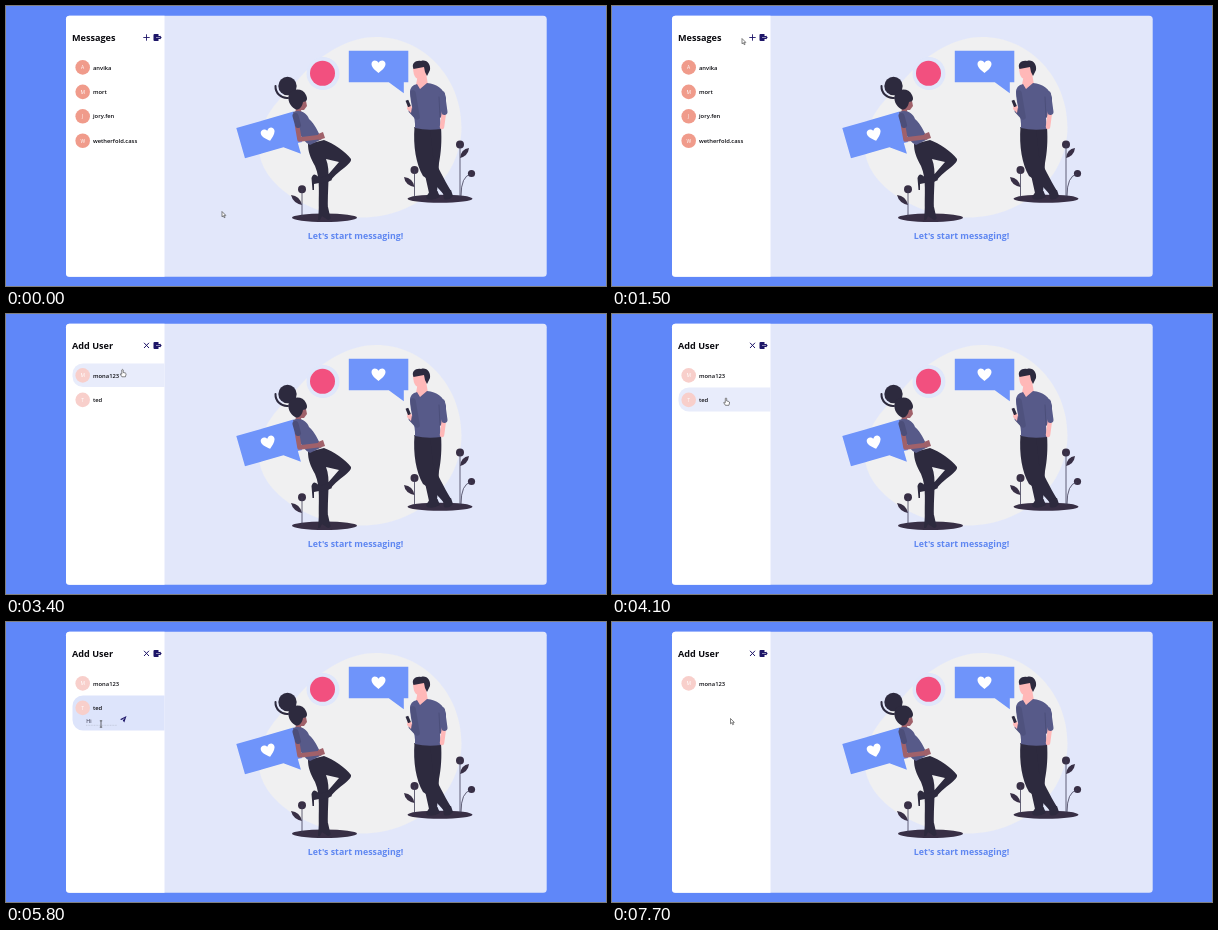
An HTML page that plays this animation: 600 by 280 pixels, repeating every 8000 ms.

```html
<!DOCTYPE html>
<html lang="en">
<head>
<meta charset="utf-8">
<title>Messages</title>
<style>
  html, body { margin: 0; width: 100%; height: 100%; overflow: hidden; background: #5f87f9; }
  svg { display: block; width: 600px; height: 280px; }
  text { font-family: "Open Sans", "Noto Sans", sans-serif; fill: #0b0b10; }
  .title { font-size: 9.1px; font-weight: 700; }
  .name { font-size: 5.8px; font-weight: 600; }
  .letter { font-size: 5px; fill: #fff; text-anchor: middle; }
  .input { font-size: 5.3px; }
  .caption { font-size: 8.8px; font-weight: 700; fill: #5f87f1; text-anchor: middle; }
  .dark { fill: #2d2a3e; }
  .ground { fill: #382f45; }
  .shirt { fill: #575a89; }
  .blue { fill: #6f94fa; }
  .pale { fill: #ffb8b8; }
  .brown { fill: #a0616a; }
  .limb { fill: none; stroke-linecap: round; stroke-linejoin: round; }
  .stem { fill: none; stroke: #3f3d56; stroke-width: .8; }
  .navy { fill: #1d1568; }
  .line { fill: none; stroke: #1d1568; }
  .cursor { fill: #fff; stroke: #333; stroke-width: .6; stroke-linejoin: round; }
</style>
</head>
<body>
<svg viewBox="0 0 600 280">
  <defs>
    <path id="heart" fill="#fff" d="M0 6.6C-3 4-7 1-7-2.5C-7-6.5-2-7.3 0-3.7C2-7.3 7-6.5 7-2.5C7 1 3 4 0 6.6Z"/>
    <path id="bubble" class="blue" d="M0 0H59.500V31.500H55V42.500L40 31.500H0Z"/>
  </defs>

  <rect x="60" y="9.800" width="480.700" height="260.900" rx="3.500" fill="#e2e7fa"/>
  <path d="M158.500 9.800H63.500a3.500 3.500 0 0 0-3.500 3.500V267.200a3.500 3.500 0 0 0 3.500 3.500H158.500Z" fill="#fff"/>

  <g id="art">
    <path fill="#f0f0f1" d="M370 31C417 31 455.500 71 455.500 121C455.500 171 412 211.500 355 211.500C304 211.500 253 178 253 142C253 110 275 92 290 76C312 50 340 31 370 31Z"/>
    <circle cx="317" cy="67.500" r="16.500" fill="#e0e7fb"/>
    <circle cx="316.500" cy="67.300" r="12.500" fill="#f2507f"/>
    <use href="#bubble" x="342.800" y="44.800"/>
    <use href="#heart" x="372.500" y="60.500"/>
    <g transform="translate(230.300 122) rotate(-16)">
      <use href="#bubble"/>
      <use href="#heart" x="29" y="15"/>
    </g>

    <!-- ground and plants -->
    <g class="ground">
      <ellipse cx="318.500" cy="211.700" rx="32.500" ry="4.300"/>
      <ellipse cx="434" cy="192.700" rx="32.500" ry="4"/>
      <circle cx="296" cy="183.300" r="4"/>
      <circle cx="408.500" cy="164" r="4"/>
      <circle cx="454" cy="138.500" r="4"/>
      <circle cx="465.500" cy="167.500" r="3.600"/>
      <path d="M296 199Q287 197 285 189Q294 190 296 199Z"/>
      <path d="M408.500 181Q399 179 398 171Q407 172 408.500 181Z"/>
      <path d="M454 152Q455 143 463 142Q462 150 454 152Z"/>
    </g>
    <path class="stem" d="M296 183V211M408.500 164V191M454 138V191M465 168Q455 170 455 190"/>

    <!-- woman -->
    <g class="dark">
      <path d="M302 138L318 134C327 137 340 146 345 153C346 158 333 164 325 174L320 171L333 156L320 153C325 165 321 182 322 206L313 207C312 188 315 174 309 160C304 151 302 145 302 138Z"/>
      <path d="M322 169L326 174Q320 178 313 177L308 178V184H306.500L305.500 172Q307 167 310 169L314 172Z"/>
      <path d="M313 201H322L324 210Q326 213 322 214L316 210L314 214H312Z"/>
    </g>
    <path class="brown" d="M291 97L300 95L301 100L298 104L295 104L296 109L289 108Z"/>
    <path class="shirt" d="M287 106C294 103 301 107 303 113C309 118 312 126 316 133L304 139C295 135 290 121 287 106Z"/>
    <path class="limb" stroke="#a0616a" stroke-width="4.500" d="M291 119L293.500 133.500L314 131"/>
    <path class="brown" d="M312 128L317 126L319 132L313 134Z"/>
    <path class="limb" stroke="#4c4e79" stroke-width="6" d="M289.500 110L292 119"/>
    <g class="dark">
      <circle cx="281.500" cy="80" r="9.200"/>
      <path d="M283 88C287 82 297 82 300 89C302 93 301 96 297 96C296 102 292 105 289 103C284 100 281 94 283 88Z"/>
    </g>
    <path class="limb" stroke="#2d2a3e" stroke-width="2" d="M269.500 80A11.500 11.500 0 0 0 282 92"/>

    <!-- man -->
    <g class="dark">
      <path d="M408.500 121L435 121C436 135 435 147 433 157L431 187H423L417 160Z"/>
      <path d="M408.500 121L424 122L427 150C431 160 438 173 445 185L438 189C432 181 424 174 417 170C410 158 407 140 408.500 121Z"/>
      <path d="M424 185H431.500L434 191Q427 195 421 193L420 191Z"/>
      <path d="M437 186L445 184L447 190Q443 195 438 193Z"/>
    </g>
    <path class="pale" d="M412 68L420 67L422 79L414 84L410 79Z"/>
    <path class="pale" d="M407 60H420L421 68Q416 74 410 72Q407 69 407 60Z"/>
    <path class="dark" d="M407.500 63C405 57 410 54 415 55C421 53 425 59 424 64L421 70L419 66L418 61Z"/>
    <path class="shirt" d="M404 85C405 80 408 79 411 78L414 83L421 77C431 78 438 83 440 92L440 106L434 112L435 123Q421 125 409 122C410 112 404 99 404 85Z"/>
    <path class="limb" stroke="#4f527e" stroke-width="5.500" d="M407 87L411 111L405.500 105"/>
    <path class="pale" d="M402 97L406 101L405 107L401 103Z"/>
    <rect class="dark" x="400.500" y="94" width="3" height="7" rx=".6" transform="rotate(-22 402 97)"/>
    <path class="limb" stroke="#ffb8b8" stroke-width="4.500" d="M438 106L436 121"/>
    <path class="limb" stroke="#575a89" stroke-width="6" d="M436 88L438.500 106"/>
    <path class="limb" stroke="#444770" stroke-width=".6" d="M433 91L434 111"/>
  </g>
  <text class="caption" x="349.500" y="233.300">Let's start messaging!</text>

  <text class="title" id="title" x="66" y="35"></text>
  <path id="plus" class="line" stroke-width=".9" d="M137.300 31.500H143.700M140.500 28.300V34.700"/>
  <path id="close" class="line" stroke-width="1" d="M138 28.800L143 34M143 28.800L138 34"/>
  <path class="navy" d="M148.500 28H152.500V30H154V29.500L155.700 31.500L154 33.500V33H152.500V35H148.500Q147.500 35 147.500 34V29Q147.500 28 148.500 28Z"/>
  <path stroke="#fff" stroke-width=".5" d="M150 31.500H154"/>

  <path id="hover"/>
  <g id="rows"></g>
  <g id="compose">
    <text class="input" id="message" x="80.300" y="101"></text>
    <path stroke="#b4bacb" stroke-width=".6" stroke-dasharray="1 .6" d="M80 103.300H111"/>
    <path class="navy" d="M120.500 94L118.300 100.500L116.800 98.500L119 95.500L115.800 98L114 97.200Z"/>
  </g>

  <g id="pointer">
    <path id="arrow" class="cursor" d="M0 0V5.300L1.300 4.200L2.200 6.200L3.100 5.800L2.200 3.900H3.800Z"/>
    <path id="hand" class="cursor" d="M-.7 .4Q0-.6 .7 .4V3L2.900 3.500Q3.700 3.800 3.500 5L2.900 7.300H-.6L-2.300 4.600Q-2 3.900 -.7 4.700Z"/>
    <path id="beam" fill="none" stroke="#333" stroke-width=".7" d="M-1.200-3.200H1.200M0-3.200V3.200M-1.200 3.200H1.200"/>
  </g>
</svg>
<script>
  const LOOP = 8000, STEP = 100;
  const $ = id => document.getElementById(id);
  const show = (id, on) => $(id).style.display = on ? '' : 'none';

  // Each table holds the value valid from its time on.
  const lists = [
    [0, ['anvika', 'mort', 'jory.fen', 'wetherfold.cass']],
    [2000, ['anvika', 'wetherfold.cass', 'mort', 'jory.fen', 'mona123', 'ted']],
    [2500, ['mona123', 'ted']],
    [7500, ['mona123']]
  ];
  const typed = [[0, ''], [5700, 'H'], [5800, 'Hi'], [6000, 'Hi '], [6400, 'Hi T'], [6500, 'Hi Te'], [6700, 'Hi Ted']];
  const shapes = [[0, 'arrow'], [1700, 'hand'], [4600, 'beam'], [7100, 'hand'], [7500, 'arrow']];
  const path = [
    [0, 216, 205.5], [700, 216, 205.5], [1500, 130, 32.5], [1600, 130, 32.5], [1800, 141.5, 32],
    [3100, 141.5, 32], [3400, 116.5, 55.5], [3500, 116.5, 55.5], [3800, 114, 84],
    [4300, 114, 84], [4800, 95, 102], [6900, 95, 102], [7300, 117.5, 96.5],
    [7500, 117.5, 96.5], [7700, 118.5, 96.5], [LOOP, 118.5, 96.5]
  ];

  const at = (table, t) => table.filter(row => row[0] <= t).pop()[1];
  const ease = k => k * k * (3 - 2 * k);

  function position(t) {
    const i = path.findIndex(p => p[0] > t);
    const [t0, x0, y0] = path[i - 1], [t1, x1, y1] = path[i];
    const k = ease((t - t0) / (t1 - t0));
    return [x0 + (x1 - x0) * k, y0 + (y1 - y0) * k];
  }

  function drawRows(names, faded) {
    $('rows').innerHTML = names.map((name, i) => {
      const y = 61.4 + i * 24.45;
      return `<circle cx="76.700" cy="${y}" r="7.300" fill="${faded ? '#f8cfcb' : '#f09b8b'}"/>
        <text class="letter" x="76.700" y="${y + 1.9}">${name[0].toUpperCase()}</text>
        <text class="name" x="87" y="${y + 2.1}">${name}</text>`;
    }).join('');
  }

  function drawHover(y, height, color) {
    const r = 10.5;
    $('hover').setAttribute('d', `M158.5 ${y}H${66.5 + r}a${r} ${r} 0 0 0 ${-r} ${r}v${height - 2 * r}a${r} ${r} 0 0 0 ${r} ${r}H158.5Z`);
    $('hover').setAttribute('fill', color);
  }

  let shown = null;
  function render(t) {
    const adding = t >= 2000, names = at(lists, t), text = at(typed, t), shape = at(shapes, t);
    const open = t >= 4200 && t < 7500;
    const [x, y] = position(t);

    if (names !== shown) drawRows(shown = names, adding);
    $('title').textContent = adding ? 'Add User' : 'Messages';
    show('plus', !adding);
    show('close', adding);

    const overFirst = t >= 3300 && y > 49.5 && y < 73;
    const overSecond = t >= 3500 && t < 7500 && y >= 73;
    show('hover', overFirst || overSecond);
    if (overFirst) drawHover(49.5, 23.5, '#e8ecfb');
    if (overSecond) drawHover(73.5, open ? 35 : 24, open ? '#dde4fb' : '#e8ecfb');

    show('compose', open);
    $('message').textContent = text || 'Say hi!';
    $('message').style.fill = text ? '#25253a' : '#777c8c';

    for (const id of ['arrow', 'hand', 'beam']) show(id, id === shape);
    $('pointer').setAttribute('transform', `translate(${x} ${y})`);
  }

  function tick() {
    const t = performance.now() % LOOP;
    render(Math.floor(t / STEP) * STEP);
    requestAnimationFrame(tick);
  }
  tick();
</script>
</body>
</html>
```
